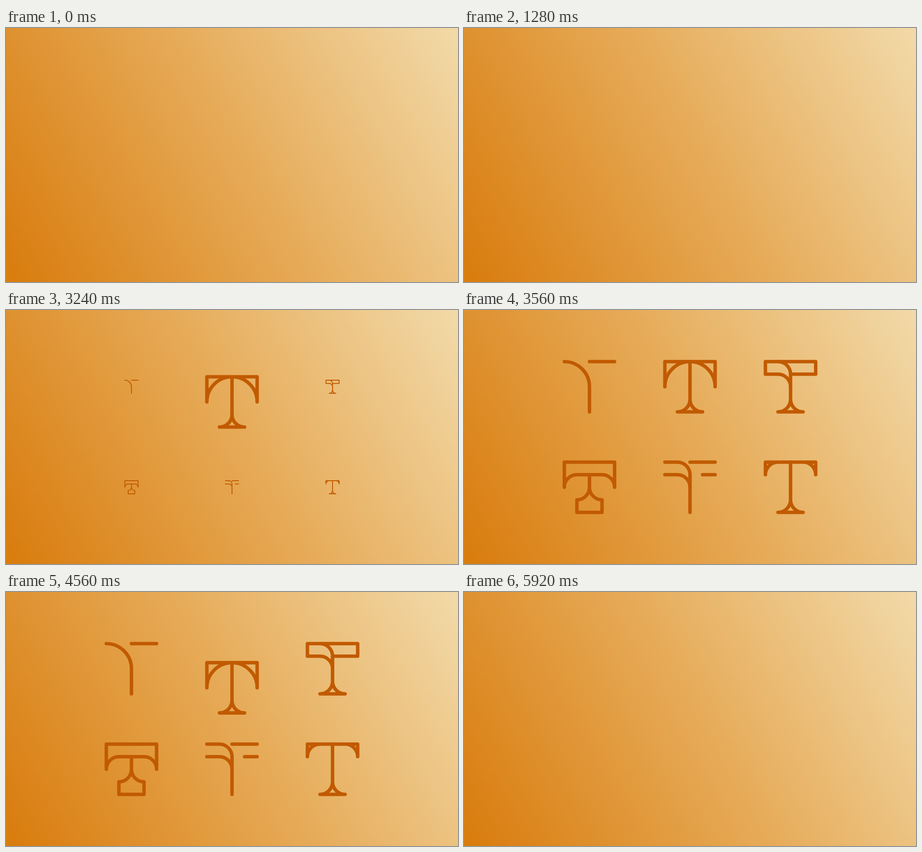
Write an HTML page that moves like this. It is 998x561 px and loops after 6080 ms.

```html
<!DOCTYPE html>
<html lang="es">
<head>
<meta charset="utf-8">
<title>Tipografía</title>
<style>
  html, body { margin: 0; width: 100%; height: 100%; overflow: hidden; }
  svg { display: block; width: 100vw; height: 100vh; }
  text { font: 700 63px Lato, sans-serif; letter-spacing: 2px; fill: #fff; }
  .icon path { fill: none; stroke: #c15a00; stroke-width: .275; stroke-linecap: round; stroke-linejoin: round; }
</style>
</head>
<body>
<svg viewBox="0 0 998 561">
  <defs>
    <linearGradient id="bg" gradientUnits="userSpaceOnUse" x1="20" y1="550" x2="998" y2="0">
      <stop offset="0" stop-color="#d97d0f"/>
      <stop offset=".5" stop-color="#e6aa57"/>
      <stop offset="1" stop-color="#f2daa9"/>
    </linearGradient>
  </defs>
  <rect width="998" height="561" fill="url(#bg)"/>
  <text id="title" x="498.5" y="318" text-anchor="middle">Tipografía</text>
</svg>
<script>
const LOOP = 6080, UNIT = 27.75, RISE = 111;
const COLS = [277, 499, 721], ROWS = [169.5, 391.5];
const svg = document.querySelector('svg');
const title = document.getElementById('title');

// Icons live on a grid from -2 to 2 around their centre.
const FOOT = 'V1A1 1 0 0 0 1 2H-1A1 1 0 0 0 0 1';
const ICONS = [
  [0, 0, 'M-2-2A2 2 0 0 1 0 0V2', 'M0-2H2'],
  [2, 0, 'M-1-1H-2V-2H2V-1H0', 'M-1-2A1 1 0 0 1 0-1' + FOOT, 'M-1-1A1 1 0 0 1 0 0'],
  [0, 1, 'M-2 0V-2H2V0A1 1 0 0 0 1-1H-1A1 1 0 0 0-2 0', 'M0-1V0A1 1 0 0 0 1 1V2H-1V1A1 1 0 0 0 0 0'],
  [1, 1, 'M-2-2H-1A1 1 0 0 1 0-1V2', 'M-2-1H-1A1 1 0 0 1 0 0', 'M0-2H2', 'M1-1H2'],
  [2, 1, 'M-2-1V-2H2V-1A1 1 0 0 0 1-2H-1A1 1 0 0 0-2-1', 'M0-2' + FOOT],
];
const HERO = ['M-2 0V-2H2V0A2 2 0 0 0 0-2A2 2 0 0 0-2 0', 'M0-2' + FOOT];

function add(tag, parent, attrs) {
  const el = document.createElementNS(svg.namespaceURI, tag);
  for (const k in attrs) el.setAttribute(k, attrs[k]);
  return parent.appendChild(el);
}

function makeIcon(paths) {
  const g = add('g', svg, { class: 'icon' });
  const lines = paths.map(d => add('path', g, { d, pathLength: 1 }));
  return { g, lines };
}

function place({ g }, x, y, size) {
  g.style.display = size > 0 ? '' : 'none';
  g.setAttribute('transform', `translate(${x} ${y}) scale(${UNIT * size})`);
}

function trim(line, p) {
  line.style.display = p > 0 ? '' : 'none';
  line.style.strokeDasharray = p < 1 ? `${p} 2` : 'none';
}

const ramp = (t, a, b) => Math.min(1, Math.max(0, (t - a) / (b - a)));
const ease = (t, a, b) => { const s = ramp(t, a, b); return s * s * (3 - 2 * s); };

const icons = ICONS.map(([c, r, ...paths]) => ({ c, r, ...makeIcon(paths) }));
const hero = makeIcon(HERO);

function draw(t) {
  title.style.opacity = ease(t, 0, 440) - ease(t, 580, 1280);

  trim(hero.lines[0], ease(t, 1800, 2860) - ramp(t, 5040, 5920));
  trim(hero.lines[1], ease(t, 1800, 2900) - ease(t, 5040, 5920));
  const up = ease(t, 2936, 3416) - ease(t, 4360, 4840);
  place(hero, COLS[1], ROWS[0] + RISE * (1 - up), 1);

  const size = ease(t, 3080, 3560) - ease(t, 4560, 5040);
  for (const icon of icons) place(icon, COLS[icon.c], ROWS[icon.r], size);
}

const start = performance.now();
function tick() {
  draw((performance.now() - start) % LOOP);
  requestAnimationFrame(tick);
}
tick();
</script>
</body>
</html>
```
